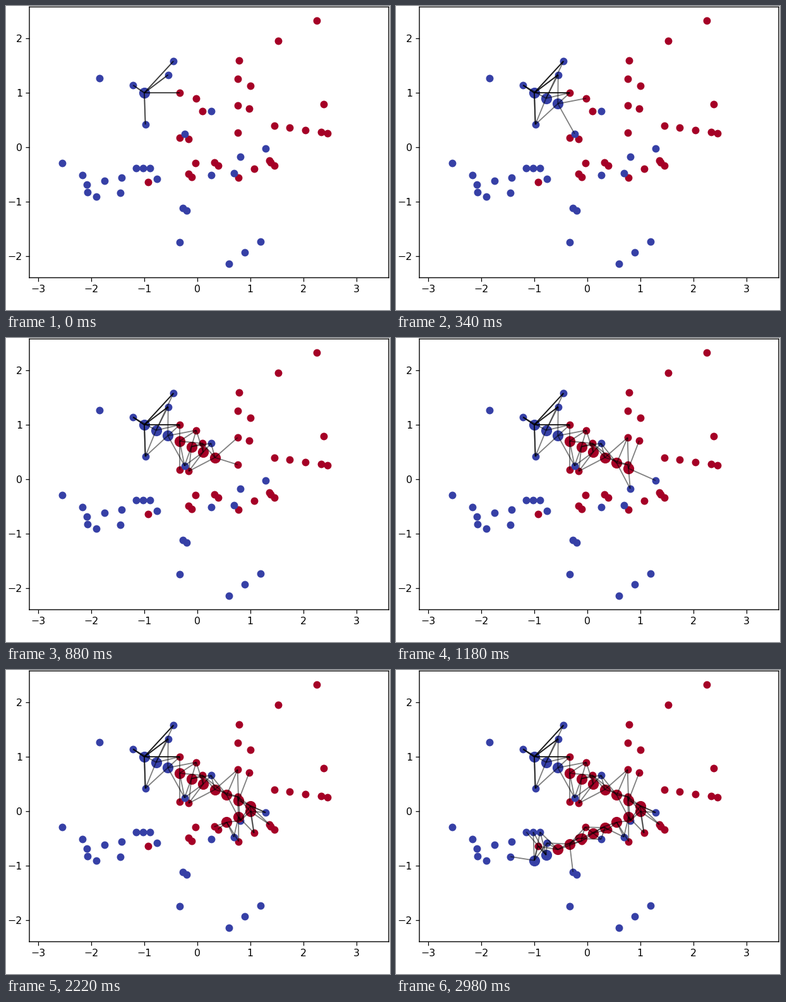
Recreate the animation shown at these times as a matplotlib script. Size 608 px wide and 480 px high, loop 3000 ms.

```python
import numpy as np
import matplotlib.pyplot as plt
from matplotlib.animation import FuncAnimation
from matplotlib.collections import LineCollection

W, H, DPI = 608, 480, 100
LOOP, STEP = 3000, 20
K = 5
COLORS = ["#a50026", "#3640a6"]
rng = np.random.default_rng(4)

# Queries run right and then back left while going steadily down.
run = np.linspace(-1, 1, 10)
queries = np.column_stack([np.r_[run, run[::-1]], 1 - .1 * np.arange(20)])


def row(start, end, n):
    return np.linspace(start, end, n)


def pair(x, y):
    return row((x, y), (x + .07, y - .05), 2)


def cloud(center, spread, n):
    """Random dots, all too far from the queries to become neighbours."""
    p = rng.normal(center, spread, (300, 2))
    gap = np.hypot(*(p[:, None] - queries).transpose(2, 0, 1)).min(axis=1)
    inside = (abs(p) < (3.3, 2.2)).all(axis=1)
    return p[(gap > .85) & inside][:n]


red = np.vstack([
    row((.79, 1.59), (2.26, 2.32), 3), row((.76, 1.26), (.76, .27), 3),
    row((1.45, .40), (2.34, .28), 4), row((.78, -.55), (1.36, -.24), 3),
    row((-.33, .18), (-.16, .15), 2),
    pair(.32, -.28), pair(-.17, -.49), pair(1.39, -.28),
    [(.98, .71), (-.02, .90), (.10, .66), (-.33, 1), (-.04, -.29),
     (-.93, -.64)],
    cloud((2.2, 0), (.8, .5), 3)])
blue = np.vstack([
    row((.60, -2.13), (1.19, -1.73), 3), row((-2.08, -.68), (-1.43, -.55), 3),
    row((-1.15, -.38), (-.89, -.38), 3), pair(-.27, -1.11),
    [(-1.21, 1.14), (-.45, 1.58), (-.55, 1.33), (-.98, .42), (-.24, .25),
     (.26, .66), (1.29, -.02), (.81, -.17), (.69, -.47), (.26, -.51),
     (-.76, -.58), (-1.45, -.83)],
    cloud((-1.5, -.8), (.7, .8), 7)])
data = np.vstack([red, blue])
label = np.repeat([0, 1], [len(red), len(blue)])

fig = plt.figure(figsize=(W / DPI, H / DPI), dpi=DPI, facecolor="white")
ax = fig.add_axes([37 / W, 51 / H, 569 / W, 427.5 / H])
ax.set(xlim=(-3.169, 3.613), ylim=(-2.390, 2.575),
       xticks=range(-3, 4), yticks=range(-2, 3))
ax.tick_params(labelsize=11.3, length=4, width=.9, pad=4)
for text in ax.get_xticklabels() + ax.get_yticklabels():
    text.set_family("DejaVu Sans")
for spine in ax.spines.values():
    spine.set(linewidth=1, snap=False)


def dots(points, kind, size):
    return ax.scatter(*np.atleast_2d(points).T, s=size, color=COLORS[kind],
                      linewidths=1, zorder=1)


def links(query, near):
    lines = LineCollection([(query, data[i]) for i in near], colors="black",
                           linewidths=1.3, alpha=.5, zorder=2)
    return ax.add_collection(lines, autolim=False)


def nearest(query):
    return np.argsort(np.hypot(*(data - query).T))[:K]


dots(red, 0, 57)
dots(blue, 1, 57)

steps = []
for q in queries:
    near = nearest(q)
    kind = int(label[near].sum() > K // 2)
    steps.append((dots(q, kind, 130), links(q, near)))

# The first query's links are laid down repeatedly, so they look darker.
links(queries[0], nearest(queries[0]))
extra = links(queries[0], nearest(queries[0]))


def clock(t):
    """Playback time, slowed by ten short pauses in the middle."""
    pauses = np.clip(t - 760 - 140 * np.arange(10), 0, 100)
    return t - int((pauses * 9 // 10).sum())


def update(frame):
    now = clock(frame * STEP)
    extra.set_visible(now >= 110)
    for n, artists in enumerate(steps):
        shown = n == 0 or now >= 110 + 100 * n
        for artist in artists:
            artist.set_visible(shown)
    return [extra, *(a for step in steps for a in step)]


anim = FuncAnimation(fig, update, frames=LOOP // STEP, interval=STEP,
                     repeat=True, repeat_delay=0, blit=False)
plt.show()
```
